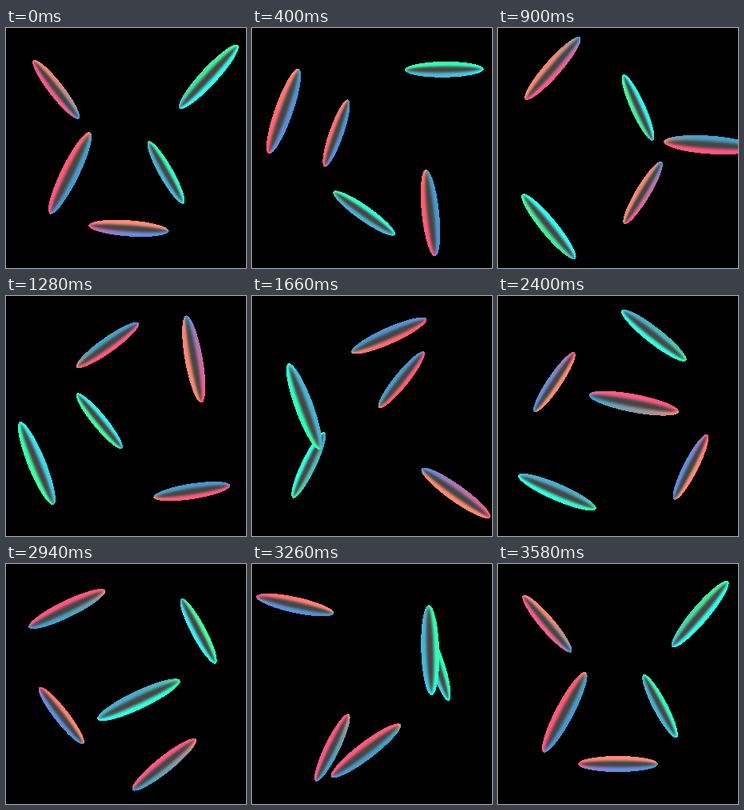
Recreate the animation shown at these times as an HTML page with a canvas. Size 300 by 300 pixels, loop 3600 ms.

```html
<!DOCTYPE html>
<html>
<head>
<meta charset="utf-8">
<style>
html, body { margin: 0; height: 100%; overflow: hidden; background: #000; }
canvas { display: block; }
</style>
</head>
<body>
<canvas id="stage" width="300" height="300"></canvas>
<script>
const ctx = document.getElementById('stage').getContext('2d');
const SIZE = 300, MID = 150, RADIUS = 100, CAMERA = 800, TAU = Math.PI * 2;
const LOOP = 3600, STEP = 20;
const GREY = [70, 70, 70];

// Rim colours around the turning light rig, every 45 degrees from its right
const wheel = hexes => hexes.split(' ').map(hex =>
  [0, 2, 4].map(i => parseInt(hex.slice(i, i + 2), 16)));
const WARM = wheel('46a2c3 f58770 ff8c76 ff5f6e ff5584 f25f8c 648cdc 4b93cd');
const COOL = wheel('32ffdc 32ffb4 46ffa0 46e69b 4caac8 46b9d7 3cf0f0 32ffeb');

const smoothstep = (from, to, v) => {
  const t = Math.min(1, Math.max(0, (v - from) / (to - from)));
  return t * t * (3 - 2 * t);
};

function spindle(k, turn) {
  const ring = k * TAU / 5 - turn;
  const x = Math.sin(2 * k * TAU / 5 + turn), y = Math.cos(ring), z = Math.sin(ring);
  const scale = CAMERA / (CAMERA + RADIUS * z);
  return {
    z, scale,
    x: MID + RADIUS * x * scale,
    y: MID + RADIUS * y * scale,
    angle: Math.atan2(x, y) + turn,
    lights: k % 2 ? COOL : WARM
  };
}

function drawSpindle(data, s, turn) {
  const a = 50 * s.scale, b = 10 * s.scale;
  const cos = Math.cos(s.angle), sin = Math.sin(s.angle);
  const start = c => Math.max(0, Math.floor(c - a));
  const end = c => Math.min(SIZE, Math.ceil(c + a));
  for (let py = start(s.y); py < end(s.y); py++) {
    for (let px = start(s.x); px < end(s.x); px++) {
      const dx = px + 0.5 - s.x, dy = py + 0.5 - s.y;
      const u = (dx * cos + dy * sin) / a, v = (dy * cos - dx * sin) / b;
      const depth = 1 - u * u - v * v;
      if (depth < 0) continue;

      // Surface normal: its tilt sets the rim strength, its heading the hue
      const nu = u / a, nv = v / b, nz = Math.sqrt(depth) / b;
      const tilt = Math.hypot(nu, nv) / Math.hypot(nu, nv, nz);
      const rim = smoothstep(0.1, 0.7, tilt);
      const heading = -Math.atan2(nv, nu) - s.angle - turn;
      const slot = ((heading / TAU * 8) % 8 + 8) % 8;
      const n = Math.floor(slot), mix = slot - n;
      const one = s.lights[n % 8], two = s.lights[(n + 1) % 8];
      const i = (py * SIZE + px) * 4;
      for (let c = 0; c < 3; c++) {
        const hue = one[c] + (two[c] - one[c]) * mix;
        data[i + c] = GREY[c] + (hue - GREY[c]) * rim;
      }
    }
  }
}

function render(ms) {
  const turn = (Math.floor(ms % LOOP / STEP) + 1) * STEP / LOOP * TAU;
  const image = ctx.createImageData(SIZE, SIZE);
  for (let i = 3; i < image.data.length; i += 4) image.data[i] = 255;
  [0, 1, 2, 3, 4].map(k => spindle(k, turn))
    .sort((p, q) => q.z - p.z)
    .forEach(s => drawSpindle(image.data, s, turn));
  ctx.putImageData(image, 0, 0);
}

const began = performance.now();
function tick() {
  render(performance.now() - began);
  requestAnimationFrame(tick);
}
tick();
</script>
</body>
</html>
```
